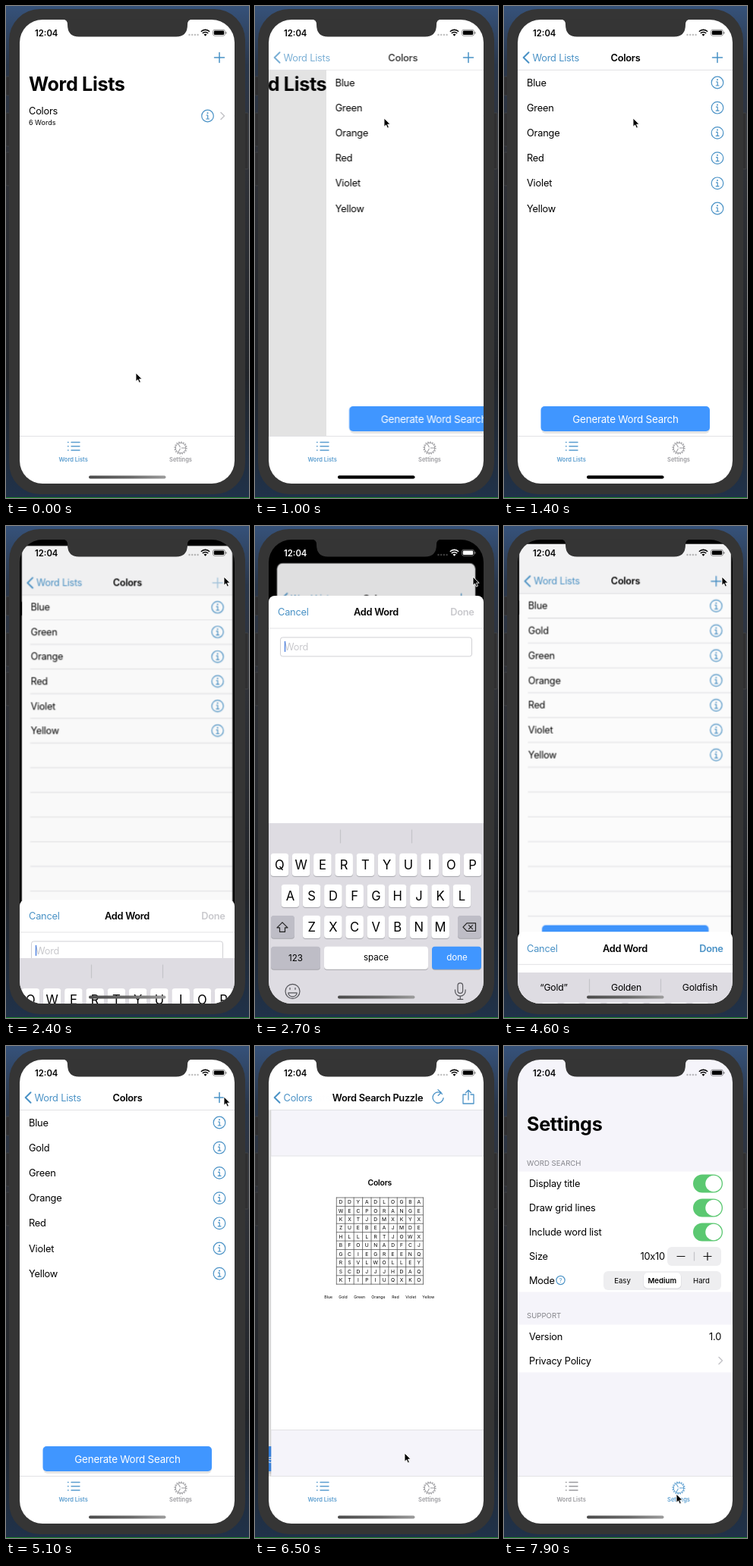
Write an HTML page that moves like this. It is 320 px wide and 649 px high and loops after 8000 ms.

```html
<!DOCTYPE html>
<html lang="en">
<head>
<meta charset="utf-8">
<title>Word list app</title>
<style>
html, body { margin: 0; width: 100%; height: 100%; overflow: hidden; background: #28384a; }
svg { display: block; width: 100vw; height: 100vh; }
text { font-family: Inter, "Liberation Sans", sans-serif; letter-spacing: -.016em; white-space: pre; }
.n { letter-spacing: 0; }
.m { text-anchor: middle; }
.e { text-anchor: end; }
.s { font-weight: 600; letter-spacing: -.022em; }
.s.n { letter-spacing: 0; }
.b { font-weight: 700; letter-spacing: -.014em; }
.t { fill: #4a92c6; }
.g { fill: #85858b; }
.w { fill: #fff; }
.off { fill: #c9c9cd; }
.line { fill: none; stroke: #4a92c6; stroke-width: 1.2; stroke-linecap: round; stroke-linejoin: round; }
.dark { stroke: #55555a; }
.pale { stroke: #c4c4c8; }
.hair { stroke: #e2e2e5; stroke-width: 1; }

.a { animation: 8s infinite cubic-bezier(.3, .4, .2, 1); }
.first { animation-name: first; }
.second { animation-name: second; }
.third { animation-name: third; }
.shade2 { animation-name: shade2; }
.shade3 { animation-name: shade3; }
.title2 { animation-name: title2; }
.back2 { animation-name: back2; }
.title3 { animation-name: title3; }
.back3 { animation-name: back3; }
.plus { animation-name: plus; }
.rule { animation-name: rule; }
.under { animation-name: under; transform-origin: 159.5px 18px; }
.dim { animation-name: dim; }
.sheet { animation-name: sheet; }
.keys { animation-name: keys; }
.mouse { animation-name: mouse; animation-timing-function: ease-in-out; }
.bar { animation: bar 8s step-end infinite; }
.status { animation: status 8s step-end infinite; }

@keyframes first { 0%, 10% { transform: none } 16.875%, to { transform: translate(-85px, 0) } }
@keyframes second {
  0%, 10% { transform: translate(283px, 0) }
  16.875%, 75.625% { transform: translate(0, 0) }
  82.5%, to { transform: translate(-85px, 0) }
}
@keyframes third { 0%, 75.625% { transform: translate(283px, 0) } 82.5%, to { transform: translate(0, 0) } }
@keyframes shade2 { 0%, 10% { opacity: 0 } 16.875%, to { opacity: .15 } }
@keyframes shade3 { 0%, 75.625% { opacity: 0 } 82.5%, to { opacity: .15 } }
@keyframes title2 {
  0%, 10% { transform: translate(130px, 0); opacity: 0 }
  16.875%, 75.625% { transform: translate(0, 0); opacity: 1 }
  82.5%, to { transform: translate(-104px, 0); opacity: 0 }
}
@keyframes title3 {
  0%, 75.625% { transform: translate(130px, 0); opacity: 0 }
  82.5%, to { transform: translate(0, 0); opacity: 1 }
}
@keyframes back2 { 0%, 10% { opacity: 0 } 16.875%, 75.625% { opacity: 1 } 82.5%, to { opacity: 0 } }
@keyframes back3 { 0%, 75.625% { opacity: 0 } 82.5%, to { opacity: 1 } }
@keyframes plus {
  0%, 27.5% { opacity: 1 } 28.75%, 31% { opacity: .45 }
  36%, 75.625% { opacity: 1 } 82.5%, to { opacity: 0 }
}
@keyframes rule { 0%, 10% { opacity: 0 } 16.875%, to { opacity: 1 } }
@keyframes under {
  0%, 29%, 61.25%, to { transform: translate(0, 0) scale(1) }
  36.5%, 54.375% { transform: translate(0, 33px) scale(.918) }
}
@keyframes dim { 0%, 29%, 61.25%, to { opacity: 0 } 36.5%, 54.375% { opacity: .1 } }
@keyframes sheet { 0%, 29%, 61.25%, to { transform: translate(0, 572px) } 36.5%, 54.375% { transform: translate(0, 0) } }
@keyframes keys { 0%, 29%, 61.25%, to { transform: translate(0, 254px) } 36.5%, 54.375% { transform: translate(0, 0) } }
@keyframes bar { 0% { fill: #fff } 29% { fill: #f6f6f7 } 61.25%, to { fill: #fff } }
@keyframes status { 0% { color: #000 } 30.6% { color: #fff } 55.6%, to { color: #000 } }
@keyframes mouse {
  0%, .5% { transform: translate(171px, 484px) }
  9%, 18% { transform: translate(170px, 148px) }
  26.5%, 64.4% { transform: translate(287px, 67px) }
  73.5%, 87% { transform: translate(197px, 537px) }
  95%, to { transform: translate(227px, 591px) }
}
</style>
</head>
<body>
<script>
let css = '', count = 0;

// Visible only between two times (ms) of the loop.
const during = (from, to, body) => {
  const name = 'on' + count++;
  css += `@keyframes ${name}{0%{opacity:${from ? 0 : 1}}${from / 80}%{opacity:1}${to / 80}%{opacity:0}}`;
  return `<g style="animation:${name} 8s step-end infinite">${body}</g>`;
};
const anim = (name, body) => `<g class="a ${name}">${body}</g>`;
// y is the middle of the capitals.
const text = (x, y, s, cls = '', size = 12.8) =>
  `<text x="${x}" y="${y + size * .364}" font-size="${size}" class="${cls}">${s}</text>`;
const rect = (x, y, w, h, fill, r = 0, more = '') =>
  `<rect x="${x}" y="${y}" width="${w}" height="${h}" rx="${r}" fill="${fill}" ${more}/>`;
const path = (d, cls = '', more = '') => `<path d="${d}" class="line ${cls}" ${more}/>`;
const circle = (x, y, r, more = '') => `<circle cx="${x}" cy="${y}" r="${r}" ${more}/>`;
const hair = (x1, x2, y) => path(`M${x1} ${y}H${x2}`, 'hair');
const each = (list, f) => [...list].map(f).join('');

const info = (x, y) => circle(x, y, 7.8, 'class="line"') +
  circle(x, y - 3.8, 1, 'class="t"') + path(`M${x - 1.5} ${y - 1}h1.7v5m-2 0h3.8`);
const chevron = (x, y) => path(`M${x - 2} ${y - 4.5}l4.5 4.5-4.5 4.5`, 'pale', 'style="stroke-width:1.5"');
const back = label => path('M32.5 61.2l-6.8 6.8 6.8 6.8', '', 'style="stroke-width:2"') + text(37.5, 68, label, 't');

// --- Screens ---
const page = fill => rect(18, 18, 283, 549, fill);
const lists = page('#fff') + text(30, 103, 'Word Lists', 'b', 25.2) +
  text(30, 138.5, 'Colors') + text(30, 153.5, '6 Words', 'n', 9) + info(265.5, 145) + chevron(285, 145);

const before = ['Blue', 'Green', 'Orange', 'Red', 'Violet', 'Yellow'];
const after = [...before, 'Gold'].sort();
const rows = words => each(words, (w, i) => text(30, 101 + 33.2 * i, w) + info(281, 101 + 33.2 * i));
const words = page('#fff') +
  during(2300, 4900, each(Array(13), (_, i) => hair(30, 301, 117.5 + 33.2 * i))) +
  during(0, 4400, rows(before)) + during(4400, 8000, rows(after)) +
  rect(49, 530, 222, 34, '#000', 6, 'opacity=".1"') + rect(48.5, 528, 222.5, 33, '#4096ff', 5) +
  text(160, 545, 'Generate Word Search', 'm w', 13.4);

const grid = ('DDYADLOGBA WECPORANGE KXTJDMXKYX ZUEBEAJMDE HLLLRTJOWX ' +
  'BFOUNADFCJ GCIEGREENQ RSVLWOLLEY SCDJJJHDAQ KTIPIUQXKO').split(' ');
const cell = 11.42;
const mesh = each(Array(11), (_, i) => `M${104 + cell * i} 200v114.2M104 ${200 + cell * i}h114.2`);
const wordX = [88, 107, 127, 150, 177, 195, 217];
const puzzle = page('#f5f4fa') + rect(18, 145, 283, 361, '#fff') +
  hair(18, 301, 145) + hair(18, 301, 506.5) + text(161, 180.5, 'Colors', 's m', 10.4) +
  path(mesh, '', 'style="stroke:#555;stroke-width:.8"') +
  each(grid, (row, j) => each(row, (c, i) =>
    text(104 + cell * (i + .5), 200 + cell * (j + .5), c, 'm n', 6.7))) +
  each(after, (w, i) => text(wordX[i], 331.5, w, 'n', 5.2));

const toggle = y => rect(249, y - 12, 39, 24, '#5bc871', 12) + circle(276, y, 10.7, 'class="w"');
const settings = page('#f5f4fa') + text(30, 103, 'Settings', 'b', 25.2) +
  text(30, 154.5, 'WORD SEARCH', 'g n', 9.6) + rect(18, 165.5, 283, 159, '#fff') +
  each(['Display title', 'Draw grid lines', 'Include word list', 'Size', 'Mode'], (s, i) =>
    text(33, 181.5 + 32 * i, s) + (i < 3 ? toggle(181.5 + 32 * i) : '')) +
  text(212, 277.5, '10x10', 'e') + rect(215, 265, 71, 25, '#eeeef0', 6) +
  path('M250.5 272v11', 'pale') + path('M228 277.5h10M263 277.5h10m-5-5v10', '', 'style="stroke:#111"') +
  circle(74.5, 309, 5.6, 'class="line"') + text(74.5, 309, '?', 'm n t', 8) +
  rect(131, 297, 155, 25, '#eeeef0', 6) + rect(183.5, 299.5, 50, 21, '#d8d8dc', 5) +
  rect(184, 299, 49, 20.5, '#fff', 5) +
  text(156, 309.5, 'Easy', 'm n', 9.6) + text(208.3, 309.5, 'Medium', 'm s n', 9.6) + text(260, 309.5, 'Hard', 'm n', 9.6) +
  text(30, 356, 'SUPPORT', 'g n', 9.6) + rect(18, 367.5, 283, 63, '#fff') +
  text(33, 383.5, 'Version') + text(286, 383.5, '1.0', 'e') +
  text(33, 415.5, 'Privacy Policy') + chevron(285, 415);

// --- Bars ---
const nav = '<rect class="bar" x="18" y="18" width="283" height="66"/>' + anim('rule', hair(18, 301, 84.5)) +
  anim('plus', path('M274.5 68h13m-6.5-6.5v13', '', 'style="stroke-width:1.5"')) +
  anim('title2', text(160, 68, 'Colors', 's m')) + anim('back2', back('Word Lists')) +
  anim('title3', text(160, 68, 'Word Search Puzzle', 's m')) +
  anim('back3', back('Colors') +
    path('M246.5 63.4a7 7.2 0 1 0 1.6 5.2M241 57.8l4.2 3.8-4 3.6', '', 'style="stroke-width:1.3"') +
    path('M278 64h-4v12h14V64h-4M281 71V58.5m-3.5 3.3l3.5-3.5 3.5 3.5', '', 'style="stroke-width:1.3"'));

const tabs = (left, right) => {
  const spokes = each([0, 120, 240], a => `<path d="M231 583h5.5" transform="rotate(${a} 230 583)"/>`);
  return path('M86 575.5h11M86 580.7h11M86 586h11M81.5 575.5h.6M81.5 580.7h.6M81.5 586h.6', '', `style="stroke:${left};stroke-width:1.4"`) +
    `<g fill="none" stroke="${right}">${circle(230, 583, 6.7)}${spokes}
    ${circle(230, 583, 7.9, 'stroke-width="1.4" stroke-dasharray="1.5 1.6"')}</g>` +
    `<g fill="${left}">${text(88.7, 598.5, 'Word Lists', 's m n', 7.5)}</g>` +
    `<g fill="${right}">${text(230, 598.5, 'Settings', 's m n', 7.5)}</g>`;
};
const blue = '#5a9dcf', grey = '#9a9a9e';
const tabBar = rect(18, 567, 283, 63, '#fff') + hair(18, 301, 567.5) +
  during(0, 7700, tabs(blue, grey)) + during(7700, 8000, tabs(grey, blue));

// --- Sheet and keyboard ---
const typed = [['G', 3400, 48.8], ['Go', 3500, 56.3], ['Gol', 3600, 59], ['Gold', 3750, 66]];
const span = (i, body) => during(typed[i][1], i < 3 ? typed[i + 1][1] : 5000, body);
const caret = x => rect(x - .7, 118.5, 1.4, 14, '#4a7fe0');
const sheet = rect(18, 58.5, 283, 600, '#fff', 8) + text(30, 80, 'Cancel', 't') + text(159.5, 80, 'Add Word', 's m') +
  during(0, 3400, text(288.5, 80, 'Done', 's e off')) +
  during(3400, 8000, text(288.5, 80, 'Done', 's e t')) + hair(18, 301, 101.5) +
  rect(33.5, 113.5, 252, 25, '#fff', 3, 'stroke="#d0d0d4"') +
  during(0, 3400, text(39, 126, 'Word', 'off') + caret(39.5)) +
  each(typed, ([s, , x], i) => span(i, text(38.5, 126, s) + caret(x))) +
  during(3400, 8000, circle(275, 126, 5.2, 'class="off"') + path('M273 124l4 4m0-4l-4 4', '', 'style="stroke:#fff"'));

const key = (x, y, w, fill = '#fff') => rect(x, y + 1, w, 30, '#a5a5ab', 4) + rect(x, y, w, 30, fill, 4);
const board = [['qwertyuiop', 20.6, 417], ['asdfghjkl', 34.6, 458], ['zxcvbnm', 62.8, 499]];
const letters = up => each(board, ([row, x, y]) => each(row, (c, i) =>
  text(x + 28.25 * i + 11.8, y + (up ? 15.5 : 14.5), up ? c.toUpperCase() : c, 'm n', up ? 16.6 : 18.4)));
const hint = (x, s) => text(x, 396.5, s, 'm', 12.2);
const faint = (s, fill = 'none') => `<tspan fill="${fill}">${s}</tspan>`;
const keyboard = rect(18, 377, 283, 254, '#dedce2') + path('M112.5 386v17M206.5 386v17', 'pale') +
  each(board, ([row, x, y]) => each(row, (c, i) => key(x + 28.25 * i, y, 23.6))) +
  during(0, 3400, letters(true)) + during(3400, 8000, letters(false)) +
  key(21, 499, 31, '#bebdc6') + key(267, 499, 31, '#bebdc6') + key(21, 540, 65, '#bebdc6') +
  key(91, 540, 137) + key(233, 540, 65, '#4096ff') +
  path('M36 508l-7 7h3.5v5.5h7V515H43z', '', 'style="stroke:#222"') +
  path('M279 509h11.5v10.5H279l-5-5.2zM281.5 511.7l5 5m0-5l-5 5', '', 'style="stroke:#222"') +
  text(53.5, 555, '123', 'm n', 11.6) + text(159.5, 554, 'space', 'm n', 11.6) +
  text(266, 554, 'done', 'm n w', 11.6) +
  circle(49.5, 599, 9.5, 'class="line dark"') + path('M43.8 601h11.4a5.7 5 0 0 1-11.4 0M46 594.5v2M53 594.5v2', 'dark') +
  rect(267, 588, 6.6, 13.5, 'none', 3.3, 'class="line dark"') + path('M263.5 597v1.5a6.8 6.8 0 0 0 13.6 0V597M270.3 605.5v4m-3.5 0h7', 'dark') +
  each(typed, ([s], i) => span(i, hint(65.5, `“${s}”`))) +
  during(3750, 4000, hint(161, `Go${faint('l')}den`) + hint(258, `Goldf${faint('is', '#a5a4aa')}${faint('h')}`)) +
  during(4000, 8000, hint(161, 'Golden') + hint(258, 'Goldfish'));

// --- Device ---
const status = `<g class="status" fill="currentColor">${text(38, 35.5, '12:04', 's n', 11.3)}
  <g opacity=".25">${each([241.5, 245.2, 248.9, 252.6], x => circle(x, 38, 1.2))}</g>
  <path d="M262.5 39.8l-2-2.2a2.9 2.9 0 0 1 4 0z"/>
  <path d="M256.9 33.7a8 8 0 0 1 11.2 0M258.8 36a5.3 5.3 0 0 1 7.4 0" fill="none" stroke="currentColor" stroke-width="1.6"/>
  <rect x="272.5" y="31.3" width="16" height="8" rx="2.4" fill="none" stroke="currentColor" stroke-width=".8" opacity=".5"/>
  <rect x="273.8" y="32.6" width="13.4" height="5.4" rx="1.3"/><rect x="289.3" y="34" width="1.2" height="2.8" rx=".6" opacity=".5"/></g>`;
const home = rect(109, 619.5, 101.5, 4, 'url(#home)', 2) + during(1000, 2200, rect(109, 619.5, 101.5, 4, '#000', 2));
const side = (x, y, h) => rect(x, y, 5, h, '#2f2f31', 1, 'stroke="#47484b" stroke-width=".7"');
const frame = rect(0, 0, 320, 649, 'url(#sky)') + rect(0, 648, 320, 1, '#1b8426') +
  side(0, 93, 25) + side(0, 141, 44) + side(0, 193, 44) + side(314, 141, 74) + rect(4, 4, 311, 640, '#353535', 41);
const notch = '<path d="M75 17.5q6 .5 6 7q0 16 15 16h128q15 0 15-16q0-6.5 6-7z" fill="#353535"/>';
const pointer = '<path d="M0 0v11.3l2.6-2.4 1.8 4.2 2-.9-1.8-4.1h3.6z" fill="#000" stroke="#fff" stroke-width=".9"/>';

const scene = frame + `<g clip-path="url(#screen)">` + rect(18, 18, 283, 612, '#000') +
  anim('under', `<g clip-path="url(#card)">` +
    anim('first', lists) + anim('shade2', page('#000')) + anim('second', words) +
    anim('shade3', page('#000')) + anim('third', puzzle) + nav +
    during(7700, 8000, settings) + tabBar + anim('dim', rect(18, 18, 283, 612, '#000')) + '</g>') +
  anim('sheet', sheet) + anim('keys', keyboard) + status + home + '</g>' + notch + anim('mouse', pointer);

document.head.append(Object.assign(document.createElement('style'), { textContent: css }));
document.body.innerHTML = `<svg viewBox="0 0 320 649"><defs>
  <linearGradient id="sky" x2="0" y2="1"><stop stop-color="#36527a"/><stop offset=".12" stop-color="#29364a"/>
  <stop offset=".3" stop-color="#303238"/><stop offset=".75" stop-color="#212429"/><stop offset="1" stop-color="#20324a"/></linearGradient>
  <linearGradient id="home"><stop stop-color="#4a4a4a"/><stop offset=".55" stop-color="#6a6a6a"/><stop offset="1" stop-color="#9c9c9c"/></linearGradient>
  <clipPath id="screen"><rect x="18" y="18" width="283" height="612" rx="30"/></clipPath>
  <clipPath id="card"><rect x="18" y="18" width="283" height="612" rx="8"/></clipPath>
  </defs>${scene}</svg>`;
</script>
</body>
</html>
```
